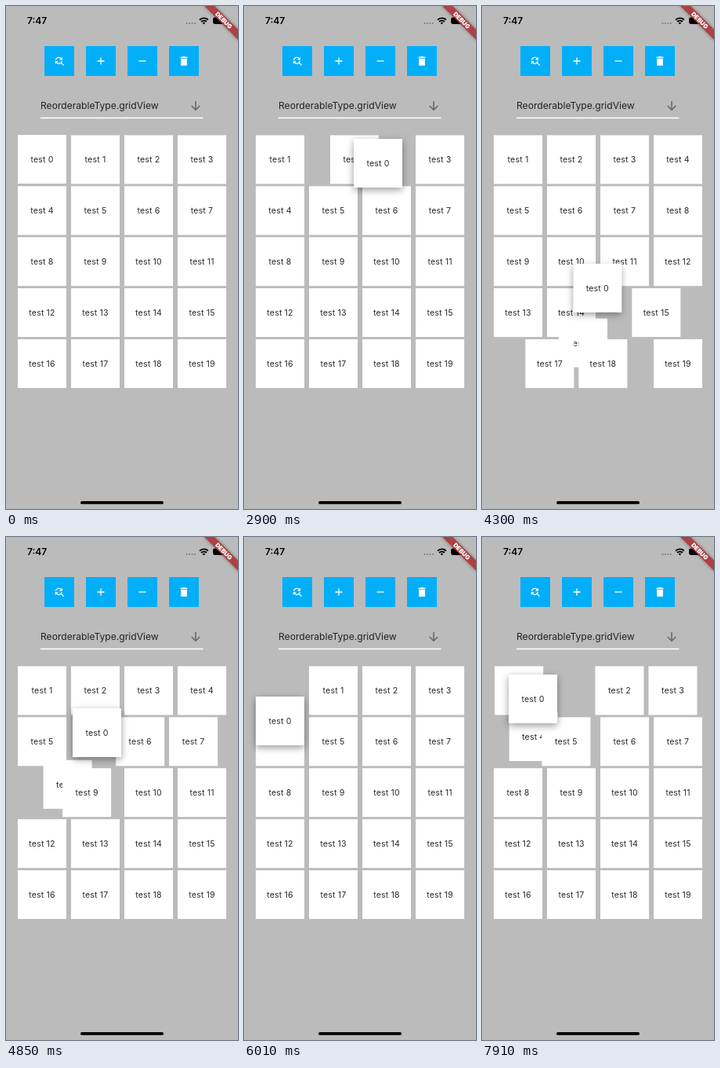
Animation, 296 px wide and 640 px high, one loop 8 s. Source, as an HTML page:

```html
<!DOCTYPE html>
<html lang="en">
<head>
<meta charset="utf-8">
<title>Reorderable grid</title>
<style>
  html, body { margin: 0; width: 100%; height: 100%; overflow: hidden; background: #bbb; }
  body { position: relative; font-family: Inter, Roboto, sans-serif; }
  svg { position: absolute; left: 0; top: 0; }
  .tile {
    position: absolute; left: 0; top: 0; width: 62px; height: 62px;
    background: #fff; color: #2a2a2a; font-size: 10.6px; line-height: 64px;
    letter-spacing: .15px; text-align: center; white-space: nowrap;
  }
</style>
</head>
<body>
<svg width="296" height="640" viewBox="0 0 296 640">
  <defs>
    <filter id="soft" x="-30%" y="-100%" width="160%" height="300%">
      <feGaussianBlur stdDeviation="2"/>
    </filter>
  </defs>

  <!-- status bar -->
  <text x="27" y="23" font-size="12" font-weight="600">7:47</text>
  <path d="M230.5 22h12" stroke="#777" stroke-width="2" stroke-linecap="round" stroke-dasharray="0 3.5"/>
  <g fill="none" stroke="#000" stroke-width="1.9">
    <path d="M247 17.6a7.6 7.6 0 0 1 10.8 0M249 20a4.8 4.8 0 0 1 6.8 0"/>
    <path d="M250.6 21.4l1.8 2l1.8-2q-1.8-1.4-3.6 0z" fill="#000" stroke="none"/>
  </g>
  <rect x="264" y="14.5" width="16" height="8.5" rx="2.4"/>

  <!-- corner banner -->
  <g transform="translate(296 0) rotate(45)">
    <rect x="-32" y="21.2" width="64" height="9.1" opacity=".4" filter="url(#soft)"/>
    <rect x="-32" y="21.2" width="64" height="9.1" fill="#ad4144"/>
    <text y="28.5" font-size="7.7" font-weight="900" fill="#fff" text-anchor="middle">DEBUG</text>
  </g>

  <g id="buttons"></g>

  <!-- dropdown -->
  <text x="44" y="131" font-size="12.1" fill="#222">ReorderableType.gridView</text>
  <path transform="translate(242 127)" d="M0-6V5M-5.2 0L0 5.2L5.2 0" fill="none" stroke="#666" stroke-width="1.5"/>
  <rect x="44" y="141.7" width="207.5" height="1.5" fill="#fff"/>

  <rect x="95" y="630" width="106" height="3.8" rx="1.9"/>
</svg>

<script>
const LOOP = 8000, COUNT = 20, SIZE = 62;
const SHIFT_MS = 300, CLAIM_DELAY = 50, STEP = 110;

// Icons on a 24 unit grid: search with arrows, plus, minus, bin.
const ICONS = [
  `<path d="M5 10a6 6 0 0 1 10.2-3.2M17 12a6 6 0 0 1-10.2 3.2M15.5 15.5l5.2 5.2"/>
   <path d="M18 4v6h-6zM4 18v-6h6z" fill="#fff" stroke="none"/>`,
  '<path d="M12 5v14M5 12h14"/>',
  '<path d="M5 12h14"/>',
  '<path d="M7 8h10v12h-10zM5 5h14M9 4h6" fill="#fff"/>'
];
document.getElementById('buttons').innerHTML = ICONS.map((icon, i) =>
  `<g transform="translate(${49 + 53 * i} 51)">
     <rect width="38" height="38" fill="#03aef8"/>
     <g transform="translate(19 19) scale(.65) translate(-12 -12)"
        fill="none" stroke="#fff" stroke-width="2">${icon}</g>
   </g>`).join('');

// The screen refreshes every STEP ms, counted anew from each of these times.
const RESTARTS = [0, 1490, 1990, 2900, 3750, 4630, 5460, 6350, 7230];

// Key points of the drag: [time, x, y].
const PATH = [
  [1940, 15, 164], [2669, 120, 165], [2900, 140, 169], [3430, 140, 328],
  [3750, 140, 408], [3980, 140, 415], [4549, 98, 260], [4850, 85, 218],
  [5400, 15, 166], [5800, 15, 166], [6010, 15, 203], [6620, 24, 322],
  [6900, 33, 315], [7330, 62, 259], [7570, 62, 195], [7780, 58, 182],
  [7890, 34, 175]
];

const clamp = v => Math.min(1, Math.max(0, v));
const lerp = (a, b, k) => a.map((v, i) => v + (b[i] - v) * k);
const slotPoint = s => [15 + 68 * (s % 4), 164.4 + 64.9 * Math.floor(s / 4)];
const slotOf = (item, claimed) => item <= claimed ? item - 1 : item;
const SLOTS = Array.from({ length: COUNT }, (_, s) => slotPoint(s));

function dragPoint(t) {
  const i = Math.max(1, PATH.findIndex(p => p[0] > t));
  const past = t >= PATH[PATH.length - 1][0];
  const b = past ? PATH[PATH.length - 1] : PATH[i], a = past ? b : PATH[i - 1];
  const k = past ? 1 : clamp((t - a[0]) / (b[0] - a[0]));
  return lerp(a, b, k).slice(1);
}

// The dragged tile claims a slot shortly after its centre enters it.
function findClaims() {
  const claims = [];
  let current = 0;
  for (let t = 0; t < LOOP; t++) {
    const [x, y] = dragPoint(t).map(v => v + SIZE / 2);
    const slot = SLOTS.findIndex(([sx, sy]) =>
      x >= sx && x <= sx + SIZE && y >= sy && y <= sy + SIZE);
    if (slot >= 0 && slot !== current) {
      claims.push({ time: t + CLAIM_DELAY, slot });
      current = slot;
    }
  }
  return claims;
}
const CLAIMS = findClaims();

// Each new slot restarts a linear move from wherever the tile is.
function itemPoint(item, t) {
  let start = -SHIFT_MS, from = SLOTS[item], slot = item;
  const at = time => lerp(from, SLOTS[slot], clamp((time - start) / SHIFT_MS));
  for (const claim of CLAIMS) {
    if (claim.time > t) break;
    const target = slotOf(item, claim.slot);
    if (target === slot) continue;
    from = at(claim.time);
    start = claim.time;
    slot = target;
  }
  return at(t);
}

const tiles = SLOTS.map((_, i) => {
  const tile = document.createElement('div');
  tile.className = 'tile';
  tile.textContent = 'test ' + i;
  tile.style.zIndex = i || COUNT;
  document.body.append(tile);
  return tile;
});

function draw(t) {
  tiles.forEach((tile, i) => {
    const [x, y] = i ? itemPoint(i, t) : dragPoint(t);
    tile.style.transform = `translate(${x}px, ${y}px)`;
  });
  const lift = clamp((t - 1380) / 330);
  tiles[0].style.boxShadow = `0 ${3 * lift}px ${9 * lift}px rgba(0, 0, 0, ${0.4 * lift})`;
}

function refreshTime(t) {
  const start = RESTARTS.filter(v => v <= t).pop();
  return start && start + Math.floor((t - start) / STEP) * STEP;
}

const origin = performance.now();
function frame() {
  draw(refreshTime((performance.now() - origin) % LOOP));
  requestAnimationFrame(frame);
}
frame();
</script>
</body>
</html>
```
